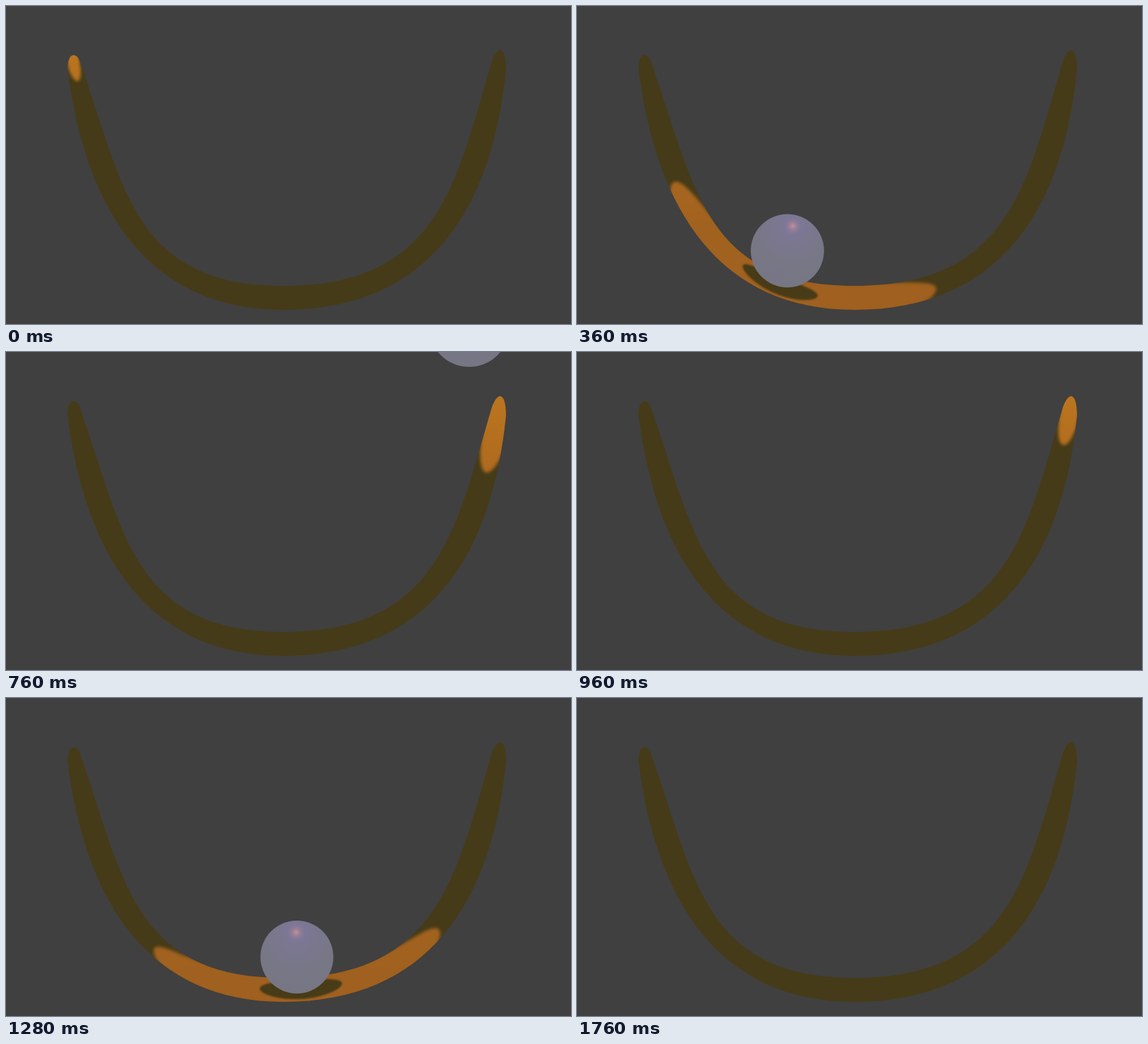
Write an HTML page with a canvas that moves like this. It is 800 by 450 pixels and loops after 1.88 s.

```html
<!DOCTYPE html>
<html lang="en">
<head>
<meta charset="utf-8">
<title>Ball in a half-pipe</title>
<style>
html, body { margin: 0; width: 100%; height: 100%; overflow: hidden; background: #404040; }
canvas { display: block; }
</style>
</head>
<body>
<canvas id="stage" width="800" height="450"></canvas>
<script>
const ctx = document.getElementById('stage').getContext('2d');
const LOOP = 1880, STEP = 40, LAST = 1760, SAMPLES = 60;

// Each side of the track: front and back edge, as Bézier curves from tip to bottom
const left = {
  front: [[87, 88], [112, 290], [203, 430], [393, 430]],
  back: [[104, 77], [166, 250], [178, 396], [393, 396]]
};
const right = {
  front: [[708, 90], [688, 290], [597, 430], [393, 430]],
  back: [[688, 78], [637, 250], [614, 396], [393, 396]]
};

// Swing of the ball: time, angle, angular speed
const swing = [
  [0, -1.86, .003], [360, -.392, .005], [520, .442, .0055], [760, 1.75, .004],
  [870, 2.06, 0], [1120, .8335, -.0055], [1480, -.8225, -.0046], [1760, -2.05, -.003]
];

const mix = (a, b, k) => a + (b - a) * k;
const between = (p, q, k) => [mix(p[0], q[0], k), mix(p[1], q[1], k)];

function bezier(pts, t) {
  while (pts.length > 1) pts = pts.slice(1).map((p, i) => between(pts[i], p, t));
  return pts[0];
}

// Points from the bottom up, with their distance along the front edge
for (const side of [left, right]) {
  let length = 0, last = side.front[3];
  side.steps = [];
  for (let i = 0; i <= SAMPLES; i++) {
    const t = 1 - i / SAMPLES, front = bezier(side.front, t), back = bezier(side.back, t);
    length += Math.hypot(front[0] - last[0], front[1] - last[1]);
    side.steps.push({ length, front, back });
    last = front;
  }
}

// u: distance from the bottom, v: 0 at the front edge, 1 at the back; straight up past the tips
function onTrack(u, v) {
  const { steps } = u < 0 ? left : right, d = Math.abs(u), end = steps[SAMPLES].length;
  let i = 1;
  while (i < SAMPLES && steps[i].length < d) i++;
  const a = steps[i - 1], b = steps[i];
  const k = Math.min(1, (d - a.length) / (b.length - a.length));
  const [x, y] = between(between(a.front, b.front, k), between(a.back, b.back, k), v);
  return [x, y - Math.max(0, d - end)];
}

const outline = new Path2D();
const curve = pts => outline.bezierCurveTo(...pts.slice(1).flat());
outline.moveTo(...left.front[0]);
curve(left.front);
curve([...right.front].reverse());
outline.bezierCurveTo(708, 58, 697, 54, ...right.back[0]);
curve(right.back);
curve([...left.back].reverse());
outline.bezierCurveTo(100, 67, 88, 64, ...left.front[0]);

const glow = ctx.createLinearGradient(0, 60, 0, 420);
glow.addColorStop(0, '#bc7620');
glow.addColorStop(.3, '#ae6a1f');
glow.addColorStop(.7, '#a2621f');
glow.addColorStop(1, '#a0601f');

// A leaning ellipse laid onto the curved track
function spot(u, v, ru, rv, lean, fill, blur) {
  ctx.beginPath();
  for (let i = 0; i < 120; i++) {
    const a = i * Math.PI / 60, dv = rv * Math.sin(a);
    ctx.lineTo(...onTrack(u + ru * Math.cos(a) - lean * dv, v + dv));
  }
  ctx.filter = `blur(${blur}px)`;
  ctx.fillStyle = fill;
  ctx.fill();
  ctx.filter = 'none';
}

function angleAt(t) {
  let i = 1;
  while (i < swing.length - 1 && swing[i][0] < t) i++;
  const [t0, a0, v0] = swing[i - 1], [t1, a1, v1] = swing[i];
  const d = t1 - t0, k = (t - t0) / d, m = 1 - k;
  return m * m * (1 + 2 * k) * a0 + k * k * (3 - 2 * k) * a1 + k * m * d * (m * v0 - k * v1);
}

function radial(x, y, r, ...stops) {
  const g = ctx.createRadialGradient(x, y, 0, x, y, r);
  stops.forEach((c, i) => g.addColorStop(i / (stops.length - 1), c));
  return g;
}

function drawBall(a) {
  const x = 398 + 262 * Math.sin(a);
  const y = 29 + 339 * Math.cos(a) - 5.5 * Math.sin(4 * a) + 2 * Math.sin(2 * a);
  const r = 51.6 + 1.7 * a * a, hx = x - 20 * Math.sin(a), hy = y - 35;
  ctx.beginPath();
  ctx.arc(x, y, r, 0, 7);
  ctx.fillStyle = radial(hx, hy, 80, '#7e779a', '#7a778f', '#787786', '#777684');
  ctx.fill();
  ctx.fillStyle = radial(hx, hy, 14, 'rgba(200,148,155,.9)', 'rgba(170,130,150,.4)', 'rgba(126,119,154,0)');
  ctx.fill();
}

function draw(t) {
  const a = angleAt(t), u = 9 + a * (301 + 7.6 * a ** 4);
  ctx.fillStyle = '#404040';
  ctx.fillRect(0, 0, 800, 450);
  ctx.fillStyle = '#453b18';
  ctx.fill(outline);
  ctx.save();
  ctx.clip(outline);
  spot(u, .25, 226, 1.065, 35 * a, glow, 2);
  spot(u, .5, 57 + 12 * a * a, .4, 0, '#473b18', 1);
  ctx.restore();
  drawBall(a);
}

const start = performance.now();
function tick() {
  const t = (performance.now() - start) % LOOP;
  draw(Math.min(Math.floor(t / STEP) * STEP, LAST));
  requestAnimationFrame(tick);
}
tick();
</script>
</body>
</html>
```
